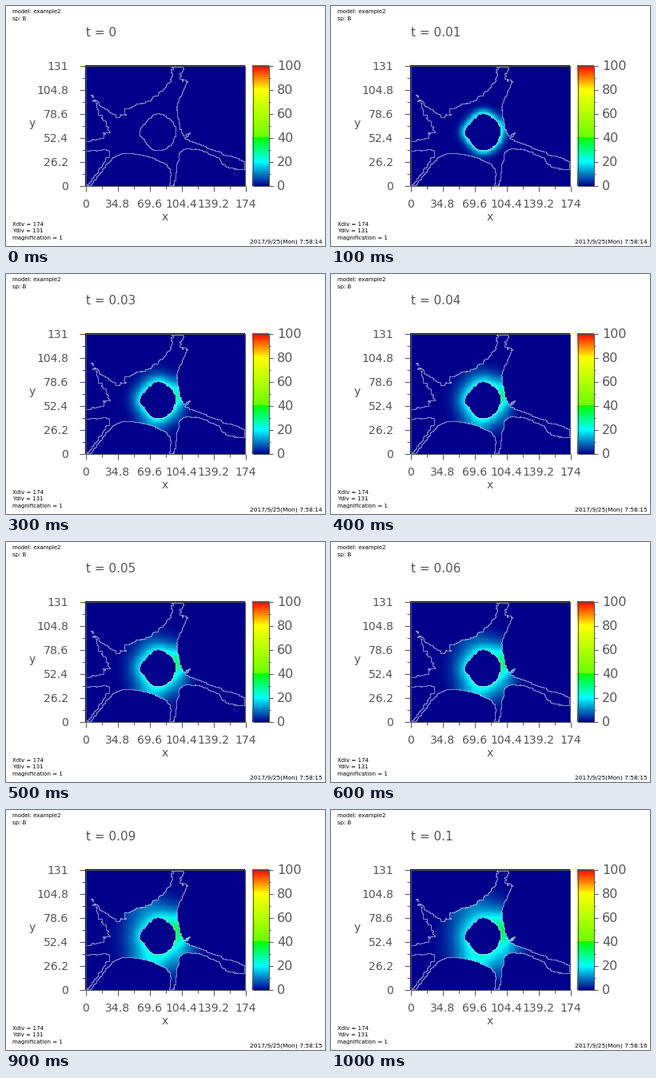
A matplotlib script that plays this animation: 399 px wide and 300 px high, repeating every 1.1 s.

```python
import numpy as np
import matplotlib.pyplot as plt
from matplotlib.animation import FuncAnimation
from matplotlib.collections import LineCollection
from matplotlib.colors import LinearSegmentedColormap
from matplotlib.path import Path

W, H, DPI = 399, 300, 100
NX, NY = 174, 131
X0, X1, Y0, Y1 = 99, 299, 74, 225
FRAMES, INTERVAL = 11, 100
DIFF, DT, SUB = 1650.0, 0.000125, 80
GREY = "#555555"

# Membrane between neighbouring dendrites: roughness and key points, clockwise
GAPS = [
    (1.2, [(208, 76), (205, 94), (182, 116), (156, 125), (140, 138), (106, 112)]),
    (1.6, [(106, 112), (117, 134), (127, 158), (100.5, 169)]),
    (0.6, [(100.5, 181), (129, 181), (119, 200), (101, 223.5)]),
    (0.2, [(106, 223.5), (136, 188), (165, 185), (202, 200), (204, 223.5)]),
    (0.5, [(210, 223.5), (221, 180), (260, 187), (275, 200), (298, 205)]),
    (0.5, [(298, 194), (262, 181), (223, 165)]),
    (0.4, [(231, 158), (221, 161), (217, 148), (213, 128), (218, 113)]),
    (0.5, [(227, 93), (218, 90), (222, 76)]),
]
NUCLEUS = [(184, 136), (198, 137), (211, 150), (209, 169),
           (197, 179), (183, 179), (173, 168), (167, 156)]

rng = np.random.default_rng(4)


def spline(points, closed=False, n=12):
    """Catmull-Rom curve through the points."""
    p = np.array(points, float)
    p = np.vstack([p[-1], p, p[:2]]) if closed else np.vstack([p[0], p, p[-1]])
    t = np.arange(n)[:, None] / n
    parts = [b + 0.5 * t * (c - a + t * (2 * a - 5 * b + 4 * c - d
                                         + t * (3 * (b - c) + d - a)))
             for a, b, c, d in zip(p, p[1:], p[2:], p[3:])]
    return np.vstack(parts + [p[-2:-1]])


def rough(points, amount):
    curve = spline(points)
    curve[1:-1] += rng.normal(0, amount, curve[1:-1].shape)
    return curve


def fill(outline):
    xs = X0 + (np.arange(NX) + 0.5) * (X1 - X0) / NX
    ys = Y0 + (np.arange(NY) + 0.5) * (Y1 - Y0) / NY
    gx, gy = np.meshgrid(xs, ys)
    inside = Path(outline).contains_points(np.c_[gx.ravel(), gy.ravel()])
    inside = inside.reshape(NY, NX)
    inside[[0, -1]] = False
    inside[:, [0, -1]] = False
    return inside


def stairs(mask):
    """Grid edges that separate filled cells from empty ones."""
    px = lambda i: X0 + i * (X1 - X0) / NX
    py = lambda j: Y0 + j * (Y1 - Y0) / NY
    lines = []
    for j, i in np.argwhere(mask[:, 1:] != mask[:, :-1]):
        lines.append([(px(i + 1), py(j)), (px(i + 1), py(j + 1))])
    for j, i in np.argwhere(mask[1:] != mask[:-1]):
        lines.append([(px(i), py(j + 1)), (px(i + 1), py(j + 1))])
    return lines


def simulate(cyto, nucleus):
    """Diffusion in the cytoplasm with influx through the nuclear membrane."""
    near = np.zeros_like(cyto)
    for axis in (0, 1):
        for d in (-1, 1):
            near |= np.roll(nucleus, d, axis)
    near &= cyto
    open_x = cyto[:, 1:] & cyto[:, :-1]
    open_y = cyto[1:] & cyto[:-1]
    c = np.zeros(cyto.shape)
    states = [c.copy()]
    for n in range((FRAMES - 1) * SUB):
        t = (n + 0.5) * DT
        fx = DIFF * DT * np.diff(c, axis=1) * open_x
        fy = DIFF * DT * np.diff(c, axis=0) * open_y
        c[:, :-1] += fx
        c[:, 1:] -= fx
        c[:-1] += fy
        c[1:] -= fy
        c[near] += 28 * np.sqrt(DIFF / (np.pi * t)) * DT
        if (n + 1) % SUB == 0:
            states.append(c.copy())
    return states


cell = fill(np.vstack([rough(points, amount) for amount, points in GAPS]))
nucleus = fill(spline(NUCLEUS, closed=True))
states = simulate(cell & ~nucleus, nucleus)

cmap = LinearSegmentedColormap.from_list("heat", [
    (0, "#00008b"), (0.2, "#00ffff"), (0.4, "#00ff00"), (0.4, "#66ff00"),
    (0.8, "#ffff00"), (1, "#ff0000")], N=512)

fig = plt.figure(figsize=(W / DPI, H / DPI), dpi=DPI, facecolor="white")
ax = fig.add_axes([0, 0, 1, 1])
ax.axis("off")


def label(x, y, s, px, ha="left", color=GREY):
    return ax.text(x, y, s, fontsize=px * 72 / DPI, ha=ha, va="baseline",
                   family="DejaVu Sans", color=color)


def line(xs, ys):
    ax.plot(xs, ys, color=GREY, lw=0.72, solid_capstyle="butt", zorder=4)


def heat(data, x0, x1):
    return ax.imshow(data, cmap=cmap, vmin=0, vmax=100, aspect="auto",
                     extent=(x0, x1, Y1, Y0), interpolation="nearest")


def box(x0, x1):
    xs = np.array([x0, x1, x1, x0, x0])
    line(xs, [Y0 + 0.5, Y0 + 0.5, Y1 - 0.5, Y1 - 0.5, Y0 + 0.5])


field = heat(states[0], X0, X1)
heat(np.linspace(100, 0, 256)[:, None], 308, 329)
ax.add_collection(LineCollection(stairs(cell) + stairs(nucleus),
                                 colors="#d0d0ec", linewidths=0.55,
                                 capstyle="butt", zorder=3))
box(X0 + 0.5, X1 - 0.5)
box(308.5, 328.5)

for k in range(11):
    x = X0 + 0.5 + 20 * k
    y = Y1 - 0.5 - 15 * k
    size = 4 if k % 2 else 7
    line([x, x], [Y1, Y1 + size])
    line([X0 - size, X0], [y, y])
    line([329, 327 + size], [y, y])
    if k % 2 == 0:
        label(x, 252, f"{NX * k / 10:g}", 14, "center")
        label(78, y + 5, f"{NY * k / 10:g}", 14, "right")
        label(339, y + 5.5, f"{10 * k}", 16)

label(199, 268, "x", 14, "center")
label(32.5, 151, "y", 14, "center")
small = [(9, "model: example2"), (18, "sp: B"), (275, "Xdiv = 174"),
         (283, "Ydiv = 131"), (292, "magnification = 1")]
for y, s in small:
    label(8.5, y, s, 7, color="black")
clock = label(305, 297, "", 7.5, color="black")
title = label(99.5, 38.5, "", 15.3)

ax.set_xlim(0, W)
ax.set_ylim(H, 0)


def update(n):
    field.set_data(states[n])
    title.set_text(f"t = {n / 100:g}")
    second = 14 + (n >= 4) + (n >= 10)
    clock.set_text(f"2017/9/25(Mon) 7:58:{second}")
    return field, title, clock


anim = FuncAnimation(fig, update, frames=FRAMES, interval=INTERVAL,
                     repeat=True, repeat_delay=0, blit=False)
plt.show()
```
